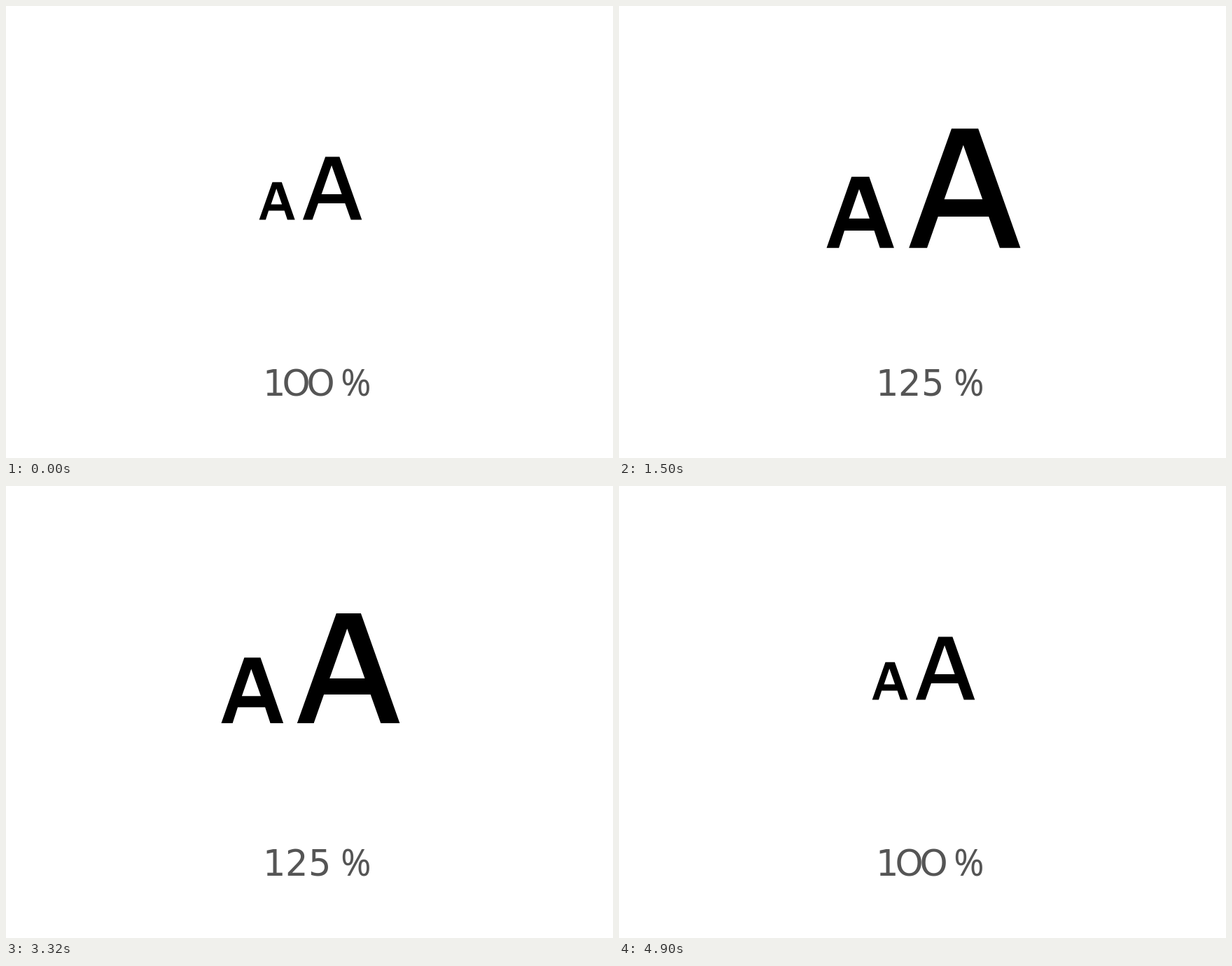
An HTML page for the animation above (5420 ms loop, 867 px wide and 646 px high).

```html
<!DOCTYPE html>
<html lang="en">
<head>
<meta charset="utf-8">
<title>Text size</title>
<style>
  html, body { margin: 0; width: 100%; height: 100%; overflow: hidden; background: #fff; }
  svg { display: block; width: 100vw; height: 100vh; }
  text { fill: #555; }
</style>
</head>
<body>
<svg viewBox="0 0 867 646" role="img" aria-label="Text size">
  <g id="icon" fill-rule="evenodd">
    <path d="M-73.3 45.1 L-54.4 -8.8 H-41.1 L-22.3 45.1 H-33 L-37.3 32 H-59.8 L-64 45.1 Z
             M-56.4 22.9 H-40.8 L-48.7 0.6 Z"/>
    <path d="M-11 45.1 L21.2 -45.1 H41.4 L73.3 45.1 H57.7 L49.3 21.5 H11 L2.7 45.1 Z
             M15.7 8.4 H44.6 L30.1 -32.7 Z"/>
  </g>
  <g id="label"></g>
</svg>
<script>
const LOOP = 5420, STEP = 1320, MOVE = 960;
const BASELINE = 556.5;
const DIGIT_FONT = '51px "DejaVu Sans", sans-serif';
const SIGN_FONT = '52px "Noto Sans", sans-serif';
const scales = [1, 1.7, 2.4, 1.7, 1];
// The round capital O stands in for a wide zero.
const labels = ['1OO', '125', '15O', '125', '1OO'];

const icon = document.getElementById('icon');
const label = document.getElementById('label');
const pen = document.createElement('canvas').getContext('2d');

const bezier = (t, a, b) => 3 * (1 - t) ** 2 * t * a + 3 * (1 - t) * t * t * b + t ** 3;

// cubic-bezier(.25, .1, .25, 1)
function ease(x) {
  if (x <= 0) return 0;
  if (x >= 1) return 1;
  let lo = 0, hi = 1;
  for (let i = 0; i < 24; i++) {
    const mid = (lo + hi) / 2;
    if (bezier(mid, 0.25, 0.25) < x) lo = mid; else hi = mid;
  }
  return bezier(lo, 0.1, 1);
}

// Places a character so that its visible shape is centred on cx.
function addGlyph(char, cx, font = DIGIT_FONT) {
  pen.font = font;
  const box = pen.measureText(char);
  const el = document.createElementNS('http://www.w3.org/2000/svg', 'text');
  el.textContent = char;
  el.style.font = font;
  el.setAttribute('x', cx - (box.actualBoundingBoxRight - box.actualBoundingBoxLeft) / 2);
  el.setAttribute('y', BASELINE);
  label.append(el);
}

let shown = '';
function setLabel(value) {
  if (value === shown) return;
  shown = value;
  label.replaceChildren();
  addGlyph(value[0], 383.5);
  addGlyph(value[1], 414.5);
  addGlyph(value[2], value[2] === 'O' ? 449.5 : 447.5);
  addGlyph('%', 499.8, SIGN_FONT);
}

function draw(time) {
  const t = time % LOOP;
  const i = Math.min(3, Math.floor(t / STEP));
  const p = ease((t - i * STEP) / MOVE);
  const s = scales[i] + (scales[i + 1] - scales[i]) * p;
  icon.setAttribute('transform', `translate(434.95 260.5) scale(${s})`);
  setLabel(labels[p < 0.5 ? i : i + 1]);
}

function tick(now) {
  draw(now);
  requestAnimationFrame(tick);
}
draw(0);
requestAnimationFrame(tick);
</script>
</body>
</html>
```
